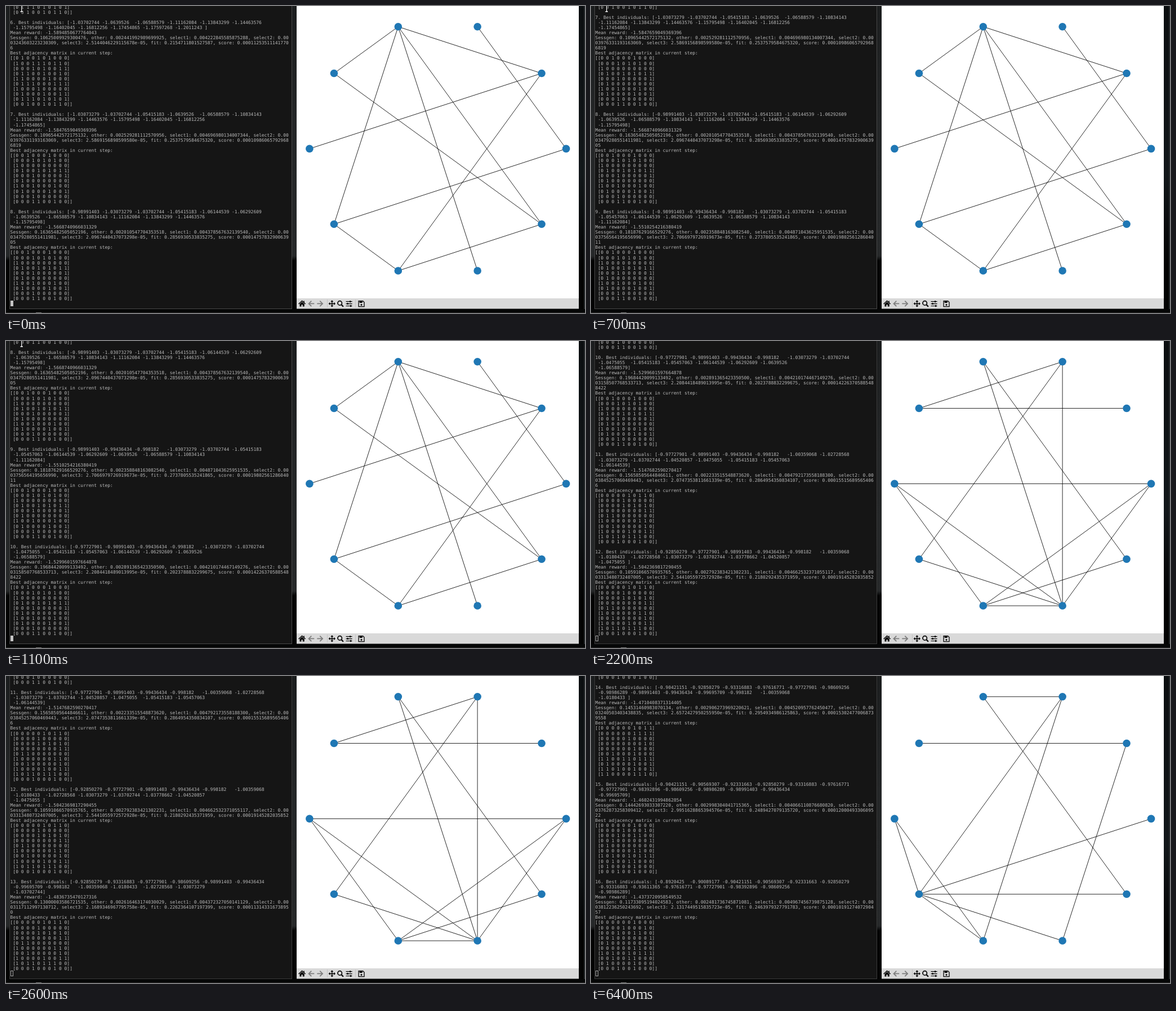
Animation of 1028x545 px, one loop 7.7 s. Source, as an HTML page:

```html
<!DOCTYPE html>
<html lang="en">
<head>
<meta charset="utf-8">
<title>Graph search</title>
<style>
  html, body { margin: 0; width: 100%; height: 100%; overflow: hidden; background: #050606; }
  #stage { position: relative; width: 1028px; height: 545px; overflow: hidden;
    background: linear-gradient(#1b1d1e 0, #242627 200px, #262829 444px, #030303 452px); }
  #stage > * { position: absolute; box-sizing: border-box; }
  #right { left: 1017px; top: 0; width: 11px; height: 545px; border-right: 2px solid #24282a;
    background: linear-gradient(#0b0e10, #12171a 300px, #030303 460px); }
  #base { left: 0; top: 538px; width: 1028px; height: 7px; background: #050606;
    border-bottom: 1px solid #262626; }
  #term { left: 6px; top: -4px; width: 502px; height: 542px; background: #151515;
    border: 1px solid #484848; }
  #term.hollow { border-color: #3a3a3a; }
  #log { left: 7.6px; top: -2.3px; margin: 0; color: #bababa; white-space: pre;
    font: 7.98px/9.073px "DejaVu Sans Mono", monospace; text-rendering: geometricPrecision; }
  #caret { left: 8px; top: 523px; width: 5px; height: 10px; }
  #caret.on { background: #c6c6c6; }
  #caret.hollow { border: 1px solid #a4a4a4; }
  svg { left: 0; top: 0; }
</style>
</head>
<body>
<div id="stage">
  <div id="right"></div>
  <div id="base"></div>
  <div id="term"></div>
  <pre id="log"></pre>
  <div id="caret"></div>
  <svg width="1028" height="545" viewBox="0 0 1028 545">
    <path d="M53 544.5h10" stroke="#8a8a8a"/>
    <g id="beam" fill="none">
      <path d="M27.7 0V9.5M25 10h5.4" stroke="#000" stroke-width="3"/>
      <path d="M27.7 0V9.5M25.4 10h4.6" stroke="#fff" stroke-width="1.3"/>
    </g>
    <path d="M516 0h501v519h-501z" fill="#fff"/>
    <path d="M516 519h501v18.5h-501z" fill="#d9d9d9"/>
    <path id="edges" fill="none" stroke="#000" stroke-width=".85"/>
    <g id="nodes" fill="#1f77b4"></g>
    <path d="M570.5 521v14M620.5 521v14" stroke="#c2c2c2"/>
    <g fill="none" stroke="#000" transform="translate(.3 .4)">
      <path d="M519.3 528.6l6-5.5 6 5.5" stroke-width="1.4"/>
      <path d="M521.2 528.7l4.1-3.8 4.1 3.8v4.4h-2.9v-3.2h-2.4v3.2h-2.9zM528 523h1.5v3h-1.5z" fill="#000" stroke="none"/>
      <g stroke="#7d7d7d" stroke-width="1.8">
        <path d="M547 528h-9.5M542 523.2l-4.8 4.8 4.8 4.8"/>
        <path d="M552 528h9.5M557 523.2l4.8 4.8-4.8 4.8"/>
      </g>
      <path d="M574 528h9M578.5 523.5v9" stroke-width="1.5"/>
      <path d="M578.5 521.8l2.6 2.8h-5.2zM578.5 534.2l2.6-2.8h-5.2zM572.3 528l2.8-2.6v5.2zM584.7 528l-2.8-2.6v5.2z" fill="#000" stroke="none"/>
      <circle cx="592.4" cy="527" r="3.7" stroke-width="1.7"/>
      <path d="M595.2 529.8l3.4 3.5" stroke-width="2.2"/>
      <path d="M603.3 524.3h11M603.3 528.2h11M603.3 532.1h11" stroke-width="1.2"/>
      <path d="M610.8 522.8v3M606.3 526.7v3M611.8 530.6v3" stroke-width="2"/>
      <path d="M625.8 523.3h7.6l2.3 2.3v7.6h-9.9z" stroke-width="1.3"/>
      <path d="M627.4 523.3h5v3.4h-5z" fill="#000" stroke="none"/>
      <circle cx="630.7" cy="530" r="1.5" fill="#000" stroke="none"/>
    </g>
  </svg>
</div>
<script>
const $ = id => document.getElementById(id);
const LOOP = 7700, COLS = 103, ROWS = 59, NODES = 10, FIRST = 6, LAST = 16;

function seeded(seed) {
  return () => {
    seed = seed + 0x6D2B79F5 | 0;
    let t = Math.imul(seed ^ seed >>> 15, 1 | seed);
    t = t + Math.imul(t ^ t >>> 7, 61 | t) ^ t;
    return ((t ^ t >>> 14) >>> 0) / 2 ** 32;
  };
}

// Each graph lists, node by node, the neighbours with a higher index.
const graph = text => text.split('|');
const start = graph('146|34578|3589|58|6|789||89|9|');
const sparse = graph('26|357||4689|9||7|9||');
const fan = graph('578|4|468|89||78|8|89||');
const dense = graph('689|6789|5|8|6|6|789|9|9|');
const hub = graph('6|48|367|9||67|789|||');
const graphAt = n => n < 7 ? start : n < 11 ? sparse : n < 14 ? fan : n < 15 ? dense : hub;

const linked = (g, i, j) => g[Math.min(i, j)].includes(Math.max(i, j)) && i !== j;

function matrixLines(g) {
  const ids = [...g.keys()];
  const rows = ids.map(i => '[' + ids.map(j => +linked(g, i, j)).join(' ') + ']');
  return `[${rows.join('\n ')}]`.split('\n');
}

// Rewards improve with every generation; only the best survive.
const pool = [];
const draw = seeded(5);
for (let n = FIRST; n <= LAST; n++)
  for (let i = 0; i < (n === FIRST ? 12 : 3); i++)
    pool.push({ born: n, reward: n === FIRST ? -1.02 - 0.2 * draw() : -1.11 + 0.0125 * (n - 7) + 0.12 * draw() });

function bestLines(n) {
  const cells = pool.filter(p => p.born <= n).map(p => p.reward)
    .sort((a, b) => b - a).slice(0, 13)
    .map(v => String(+v.toFixed(8)).padEnd(11));
  const lines = [];
  while (cells.length) lines.push(cells.splice(0, 6).join(' '));
  return `${n}. Best individuals: [${lines.join('\n ')}]`.split('\n');
}

function stepLines(n) {
  const rand = seeded(n);
  const digits = count => Array.from({ length: count }, () => Math.floor(rand() * 10)).join('');
  const mean = -1.6 + 0.015 * (n - FIRST) + 0.02 * rand();
  const tail = (n - 12) ** 2 % 7; // characters wrapped to a third line
  const stats = `Sessgen: 0.1${digits(16)}, other: 0.002${digits(15)}, select1: 0.004${digits(15)}, ` +
    `select2: 0.0003${digits(15)}, select3: 2.${digits(16)}e-05, fit: 0.2${digits(15)}, ` +
    `score: 0.0001${digits(13 + tail)}`;
  return ['', ...bestLines(n), 'Mean reward: ' + mean.toFixed(16),
    ...stats.match(new RegExp(`.{1,${COLS}}`, 'g')),
    'Best adjacency matrix in current step:', ...matrixLines(graphAt(n))];
}

function screen(last) {
  const lines = matrixLines(start);
  for (let n = FIRST; n <= last; n++) lines.push(...stepLines(n));
  return [...lines, ''].slice(-ROWS).join('\n');
}

const spot = i => {
  const a = i * 2 * Math.PI / NODES;
  return [766.7 + 227.8 * Math.cos(a), 253.4 - 227.8 * Math.sin(a)].map(v => v.toFixed(2));
};
const nodes = Array.from({ length: NODES }, (_, i) => spot(i));
$('nodes').innerHTML = nodes.map(([x, y]) => `<circle cx="${x}" cy="${y}" r="6.8"/>`).join('');

const edgePath = g => g.map((list, i) =>
  [...list].map(j => `M${nodes[i]}L${nodes[j]}`).join('')).join('');

const printed = [[0, 8], [700, 9], [1100, 10], [1500, 11], [2200, 12], [2600, 13], [6000, 15], [6400, 16]];

let shown;
function showStep(n) {
  if (n === shown) return;
  shown = n;
  $('log').textContent = screen(n);
  $('edges').setAttribute('d', edgePath(graphAt(n - 1))); // the plot lags one step
}

const begin = performance.now();
function tick() {
  const t = (performance.now() - begin) % LOOP;
  showStep(printed.filter(p => p[0] <= t).pop()[1]);
  const caret = t >= 1700 ? 'hollow' : t % 1000 < 500 ? 'on' : 'off';
  $('caret').className = $('term').className = caret;
  $('beam').style.display = t < 1600 ? '' : 'none';
  requestAnimationFrame(tick);
}
tick();
</script>
</body>
</html>
```
